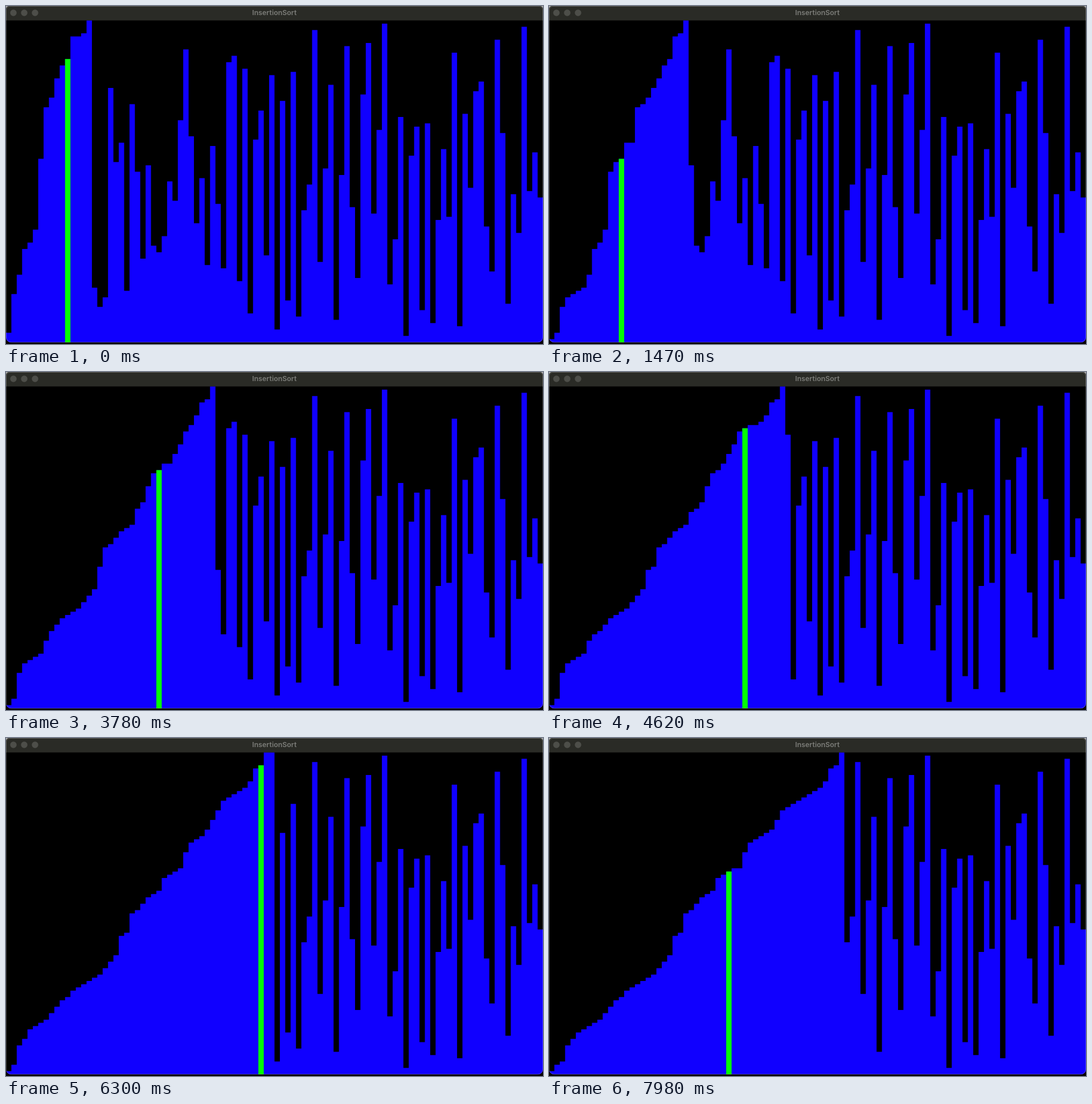
Animation, 943 px wide and 594 px high, one loop 8 s. Source, as an HTML page with a canvas:

```html
<!DOCTYPE html>
<html lang="en">
<head>
<meta charset="utf-8">
<title>InsertionSort</title>
<style>
  html, body { margin: 0; width: 100%; height: 100%; overflow: hidden; background: #000; }
  canvas { display: block; }
</style>
</head>
<body>
<canvas id="stage" width="943" height="594"></canvas>
<script>
const ctx = document.getElementById('stage').getContext('2d');
const WIDTH = 943, HEIGHT = 594, BASE = 591.1, TITLE_HEIGHT = 25.4;
const COUNT = 100, BAR = WIDTH / COUNT, UNIT = 5.658;
const LOOP = 8000, TICK = 70;

// The input still to be sorted. Every other value up to COUNT is already in order before it.
const unsorted = [
  1, 17, 11, 14, 79, 56, 62, 16, 74, 53, 26, 55, 30, 28, 33, 50, 44, 69, 91, 64, 37, 51, 24, 61, 43,
  23, 87, 89, 19, 85, 9, 63, 72, 27, 83, 4, 75, 13, 84, 8, 41, 49, 97, 25, 54,
  80, 7, 52, 92, 42, 20, 77, 93, 40, 66, 99, 18, 32, 70, 2, 58, 67, 10, 68, 6,
  38, 60, 39, 90, 5, 71, 48, 78, 81, 36, 22, 94, 65, 12, 46, 34, 98, 47, 59, 45
];
const sorted = Array.from({ length: COUNT }, (_, i) => i + 1).filter(v => !unsorted.includes(v));

// Key points [time in ms, shifts done] of the slightly uneven pace.
const PACE = [[0, 3], [1470, 132], [2520, 227], [3780, 335], [5530, 489], [7980, 701]];

function shiftsAt(time) {
  const k = Math.max(1, PACE.findIndex(([t]) => t >= time));
  const [t0, s0] = PACE[k - 1], [t1, s1] = PACE[k];
  return Math.round(s0 + (s1 - s0) * (time - t0) / (t1 - t0));
}

// Insertion sort, paused right after the given number of shifts.
function sortUntil(shifts) {
  const values = [...sorted, ...unsorted];
  for (let i = sorted.length; i < COUNT; i++) {
    const key = values[i];
    let j = i - 1;
    while (j >= 0 && values[j] > key) {
      values[j + 1] = values[j];
      j--;
      if (--shifts === 0) return { values, cursor: j };
    }
    values[j + 1] = key;
  }
  return { values, cursor: -1 };
}

const barTop = value => BASE - value * UNIT;

function drawBars({ values, cursor }) {
  ctx.fillStyle = '#1000ff';
  ctx.beginPath();
  ctx.moveTo(0, BASE);
  values.forEach((value, i) => {
    ctx.lineTo(i * BAR, barTop(value));
    ctx.lineTo((i + 1) * BAR, barTop(value));
  });
  ctx.lineTo(WIDTH, BASE);
  ctx.fill();
  if (cursor >= 0) {
    ctx.fillStyle = '#04ff00';
    ctx.fillRect(cursor * BAR, barTop(values[cursor]), BAR, values[cursor] * UNIT);
  }
}

function drawTitleBar() {
  ctx.fillStyle = '#2a2b26';
  ctx.fillRect(0, 0, WIDTH, TITLE_HEIGHT);
  ctx.fillStyle = '#4d4e49';
  for (const x of [13, 32, 51]) {
    ctx.beginPath();
    ctx.arc(x, 12, 5.7, 0, 2 * Math.PI);
    ctx.fill();
  }
  ctx.fillStyle = '#7b7c78';
  ctx.font = '600 12.4px Inter, sans-serif';
  ctx.textAlign = 'center';
  ctx.fillText('InsertionSort', 471.3, 16);
}

function windowShape(inset) {
  ctx.beginPath();
  ctx.roundRect(inset, inset, WIDTH - 2 * inset, BASE + 0.4 - 2 * inset, [6, 6, 9, 9]);
}

function drawDesktop() {
  ctx.fillStyle = '#080405';
  ctx.fillRect(0, 0, WIDTH, HEIGHT);
  ctx.fillStyle = '#b0b0b0';
  ctx.fillRect(0, 0, WIDTH, 8);
}

function draw(now) {
  const time = Math.floor((now % LOOP) / TICK) * TICK;
  drawDesktop();
  ctx.save();
  windowShape(0);
  ctx.clip();
  ctx.fillStyle = '#000';
  ctx.fillRect(0, 0, WIDTH, HEIGHT);
  drawBars(sortUntil(shiftsAt(time)));
  drawTitleBar();
  ctx.restore();
  windowShape(0.5);
  ctx.strokeStyle = 'rgba(255, 255, 255, 0.25)';
  ctx.stroke();
  requestAnimationFrame(draw);
}
requestAnimationFrame(draw);
</script>
</body>
</html>
```
